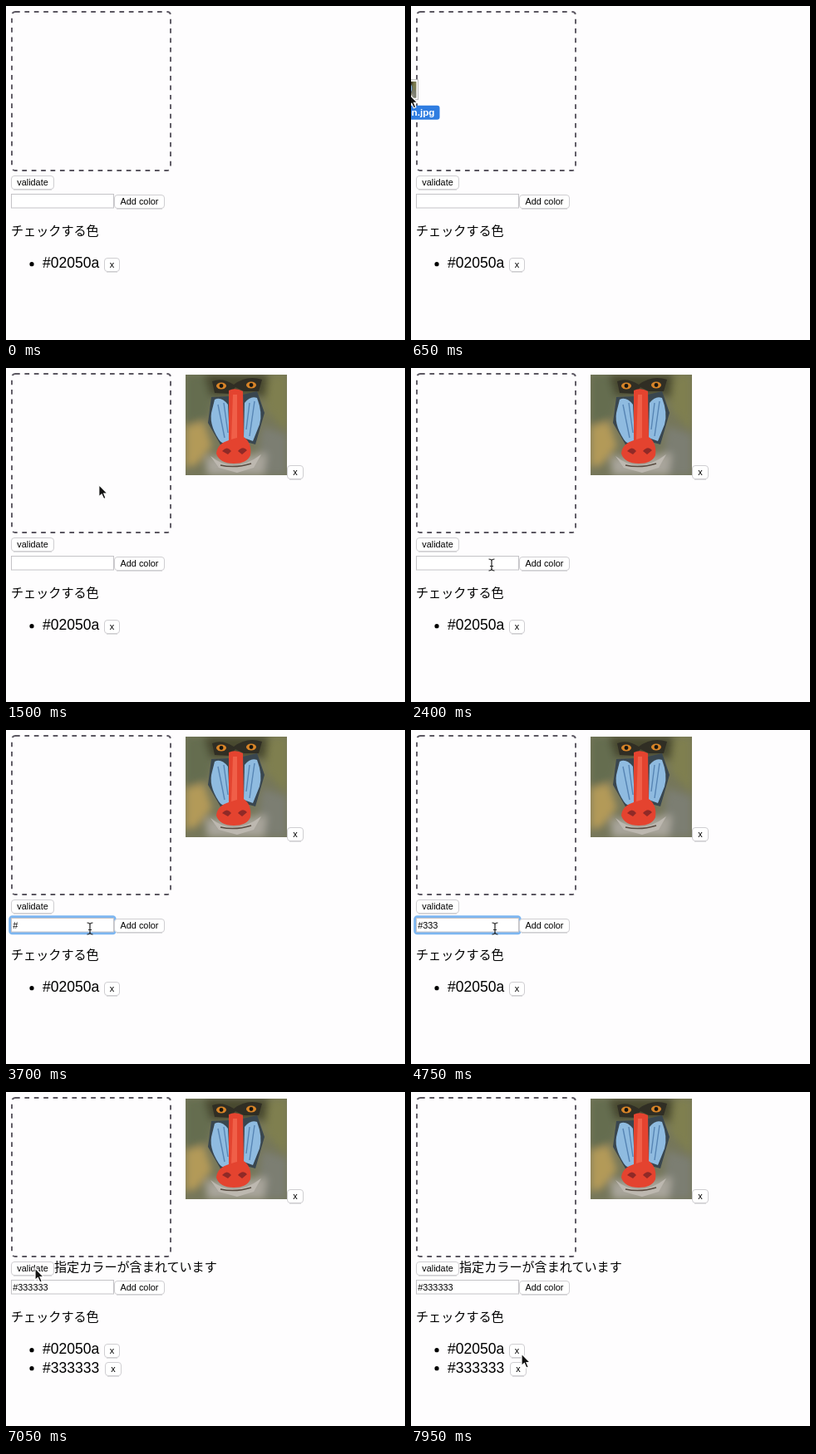
Animation, 480 px wide and 402 px high, one loop 8000 ms. Source, as an HTML page:

```html
<!DOCTYPE html>
<html lang="ja">
<head>
<meta charset="utf-8">
<title>Color check</title>
<style>
html, body { margin: 0; width: 100%; height: 100%; overflow: hidden; background: #fefdfe; }
svg { display: block; }
text { white-space: pre; }
.ui { font: 10.9px "Liberation Sans", Arial, sans-serif; fill: #000; }
.ja { font: 15.1px "Noto Sans CJK JP", "Noto Sans CJK", sans-serif; fill: #000; }
.item { font: 17.5px "Liberation Sans", Arial, sans-serif; fill: #000; }
.file { font: bold 11.7px "Liberation Sans", Arial, sans-serif; fill: #fff; }
.face { fill: #fff; stroke: #cfced1; }
.down .face { fill: #e2e2e4; }
.mid { text-anchor: middle; }
</style>
</head>
<body>
<svg width="480" height="402" viewBox="0 0 480 402">
  <defs>
    <clipPath id="crop"><rect width="122" height="121"/></clipPath>
    <filter id="soft" x="-5%" y="-5%" width="110%" height="110%"><feGaussianBlur stdDeviation=".5"/></filter>
    <filter id="blur" x="-40%" y="-40%" width="180%" height="180%"><feGaussianBlur stdDeviation="5"/></filter>
    <symbol id="photo" viewBox="0 0 122 121">
      <g clip-path="url(#crop)">
        <rect width="122" height="121" fill="#75765a"/>
        <g filter="url(#blur)">
          <path d="M0 0H40L28 50 0 62Z" fill="#656d50"/>
          <path d="M84 0H122V70L98 44Z" fill="#7f7f50"/>
          <path d="M22 0H100L96 30 88 24 30 26Z" fill="#47462f"/>
          <path d="M0 62 22 56 32 86 14 108 0 112Z" fill="#b39a59"/>
          <path d="M92 62 122 72V121H84Z" fill="#7c7e72"/>
          <path d="M24 98 60 100 98 94 94 121H26Z" fill="#a9a59b"/>
        </g>
        <g filter="url(#soft)">
          <path d="M32 8Q44 3 58 12 74 0 92 6L88 20 70 20 60 15 53 23 35 22Z" fill="#302e24"/>
          <path d="M31 27 52 26 54 82 43 86 27 58ZM69 24 86 20 95 46 84 84 69 80Z" fill="#39464f"/>
          <path d="M35 30Q43 26 51 36L53 79Q45 86 40 78Q27 58 32 42Z" fill="#8fbbe0"/>
          <path d="M71 34Q78 25 86 28Q93 46 89 60L81 80 70 76Z" fill="#8fbbe0"/>
          <path d="M39 36 47 76M46 34 51 70M83 32 77 74M77 34 73 66" fill="none" stroke="#5785b4" stroke-width="1.4"/>
          <path d="M30 98Q58 121 91 96L82 112 62 118 40 112Z" fill="#bdb8b0"/>
          <path d="M52 19Q60 15 69 20L70 75Q80 82 78 97Q74 107 58 107Q41 107 37 95Q38 83 52 79Z" fill="#e4432f"/>
          <path d="M57 24 62 24 62 76 55 78Z" fill="#f05f48"/>
          <path d="M44 92Q50 85 55 92L51 96ZM63 92Q69 85 74 91L68 96Z" fill="#8f2a27"/>
          <path d="M42 109Q60 113 79 107" fill="none" stroke="#57493f" stroke-width="1.5"/>
          <ellipse cx="43" cy="13.5" rx="6" ry="4" fill="#d88428"/>
          <ellipse cx="79" cy="12.5" rx="6" ry="4" fill="#d88428"/>
          <circle cx="43" cy="13.5" r="2.4" fill="#17150f"/>
          <circle cx="79" cy="12.5" r="2.4" fill="#17150f"/>
        </g>
      </g>
    </symbol>
  </defs>

  <rect id="zone" x="7" y="7" width="191" height="191" rx="4" fill="none" stroke="#5b5761" stroke-width="1.9"/>
  <g id="added">
    <use href="#photo" x="216" y="8" width="122" height="121"/>
    <g data-btn="338,117,20,17,x"></g>
  </g>

  <g id="validate" data-btn="6,204,52,17,validate"></g>
  <text id="result" class="ja" x="58" y="215.6">指定カラーが含まれています</text>

  <rect id="ring" x="5" y="225" width="126" height="19.5" rx="2.5" fill="none" stroke="#7db6f1" stroke-width="3.5"/>
  <rect x="6.5" y="226.5" width="123" height="16.5" fill="#fff" stroke="#c4c3c7"/>
  <text id="field" class="ui" x="8.2" y="239"></text>
  <g id="add" data-btn="130,227,61,17,Add color"></g>

  <text class="ja" x="6" y="275.6">チェックする色</text>
  <circle cx="31" cy="310.7" r="2.6"/>
  <text class="item" x="44" y="315">#02050a</text>
  <g data-btn="118,303,19,17,x"></g>
  <g id="item">
    <circle cx="31" cy="332.7" r="2.6"/>
    <text class="item" x="44" y="337.5">#333333</text>
    <g data-btn="119,325,20,17,x"></g>
  </g>

  <g id="cursor">
    <g id="drag">
      <rect x="-13" y="-17" width="24" height="24" fill="#fff" stroke="#aaa" stroke-width=".8"/>
      <use href="#photo" x="-11" y="-15" width="20" height="20"/>
      <rect x="-38" y="14" width="75" height="17" rx="3" fill="#2f7de1"/>
      <text class="file mid" x="-.5" y="26.5">baboon.jpg</text>
    </g>
    <path id="arrow" d="M0 0V14.5L3.3 11.5 5.8 17 8.3 16 6 10.5H10.3Z" fill="#111" stroke="#fff" stroke-width="1.2"/>
    <path id="beam" d="M-3.5 -7Q0 -7 0 -4.5V4.5Q0 7 -3.5 7M3.5 -7Q0 -7 0 -4.5V4.5Q0 7 3.5 7M-2 1.5H2" fill="none" stroke="#222" stroke-width="1.2"/>
  </g>
</svg>
<script>
const LOOP = 8000, STEP = 50;
const $ = id => document.getElementById(id);
const show = (id, on) => { $(id).style.display = on ? '' : 'none'; };
const within = (t, a, b) => t >= a && t < b;

// Pointer stops: time, x, y
const stops = [
  [500, -100, 110], [1050, 107, 101], [1400, 107, 101], [2100, 125, 250],
  [2200, 125, 250], [2400, 97, 237], [2450, 97, 237], [2700, 101, 239],
  [4750, 101, 239], [4900, 170, 235], [5300, 170, 235], [5600, 174, 251],
  [5850, 174, 251], [6050, 104, 240], [6200, 104, 240], [6250, 82, 232],
  [6300, 82, 232], [6550, 35, 212], [7100, 35, 212], [7600, 122, 327],
  [7800, 122, 327], [7950, 133, 315]
];
const typed = [[0, ''], [3300, '#'], [3900, '#3'], [4200, '#33'], [4600, '#333'], [5200, '#333333']];

for (const g of document.querySelectorAll('[data-btn]')) {
  const [x, y, w, h, label] = g.dataset.btn.split(',');
  const cx = +x + w / 2;
  g.innerHTML = `<path d="M${+x + 3} ${+y + +h}h${w - 6}" stroke="#c0bfc3"/>
    <rect class="face" x="${+x + .5}" y="${+y + .5}" width="${w - 1}" height="${h - 1}" rx="3.5"/>
    <text class="ui mid" x="${cx}" y="${+y + 12.3}">${label}</text>`;
}

function pointer(t) {
  const i = stops.findIndex(s => s[0] > t);
  if (i === 0) return stops[0].slice(1);
  if (i < 0) return stops[stops.length - 1].slice(1);
  const [t0, x0, y0] = stops[i - 1], [t1, x1, y1] = stops[i];
  const k = 1 - (1 - (t - t0) / (t1 - t0)) ** 2;
  return [x0 + (x1 - x0) * k, y0 + (y1 - y0) * k];
}

function draw(t) {
  const [x, y] = pointer(t);
  const over = x > 6 && t < 1250;
  const beam = x > 6 && x < 130 && y > 225 && y < 244;

  $('zone').setAttribute('fill', over ? '#ebebeb' : 'none');
  $('zone').setAttribute('stroke-dasharray', over ? 'none' : '5.7');
  $('cursor').setAttribute('transform', `translate(${x} ${y})`);
  show('drag', t < 1100);
  show('arrow', !beam);
  show('beam', beam);
  show('added', t >= 1250);
  show('ring', within(t, 2600, 5100));
  show('item', t >= 5200);
  show('result', t >= 6700);
  $('field').textContent = typed.filter(s => s[0] <= t).pop()[1];
  $('add').classList.toggle('down', within(t, 5100, 5200));
  $('validate').classList.toggle('down', within(t, 6600, 6700));
}

function tick() {
  const t = performance.now() % LOOP;
  draw(Math.floor(t / STEP) * STEP);
  requestAnimationFrame(tick);
}
tick();
</script>
</body>
</html>
```
